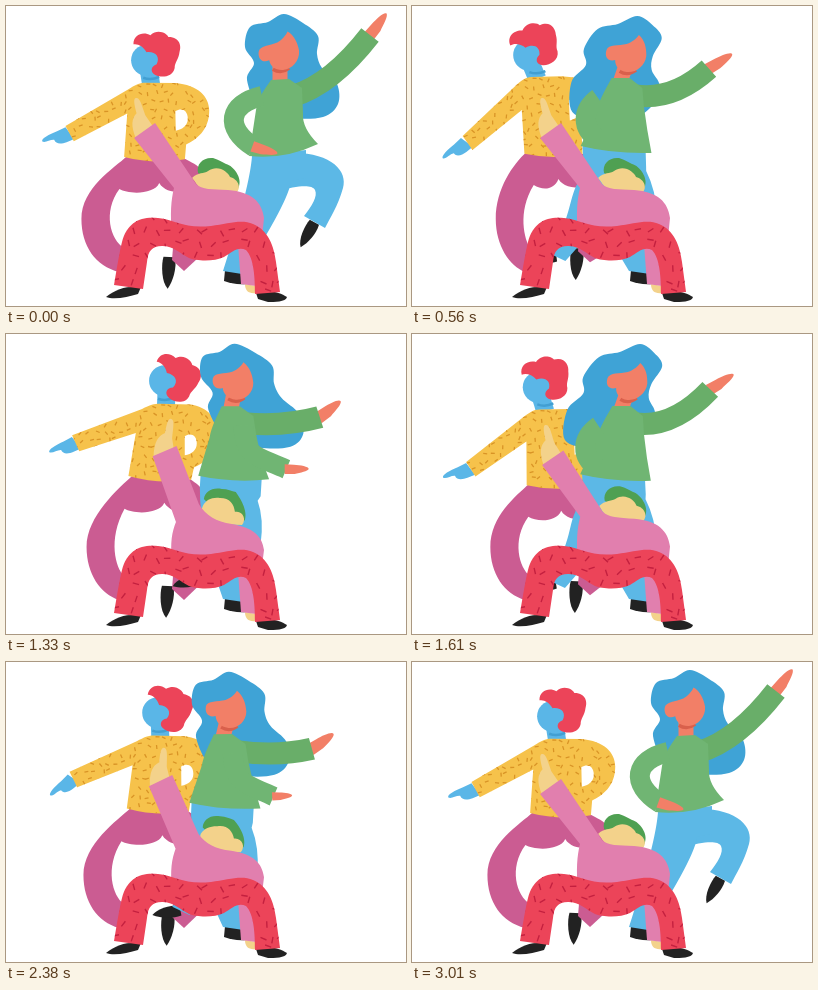
Animation of 400 by 300 pixels, one loop 3.08 s. Source, as an HTML page:

```html
<!DOCTYPE html>
<html>
<head>
<meta charset="utf-8">
<style>
html, body { margin: 0; width: 100%; height: 100%; overflow: hidden; background: #fff; }
svg { display: block; width: 100vw; height: 100vh; }
</style>
</head>
<body>
<svg id="stage" viewBox="0 0 400 300"></svg>
<script>
const STEP = 70, FRAMES = 44, CYCLE = 43;
const C = {
  blue: '#5ab6e7', blueShade: '#429fd2', red: '#ec4459', mustard: '#f6c24b', mustardMark: '#d99426',
  plum: '#cb5c92', pink: '#e17fae', cream: '#f3d28b', leaf: '#4fa052', ink: '#222222',
  redMark: '#c4203f', sea: '#3fa3d6', coral: '#f27f67', coralShade: '#d9604c',
  green: '#70b573', greenShade: '#69ae69', denim: '#5cb8e6'
};

const fill = (d, color, extra = '') => `<path d="${d}" fill="${color}" ${extra}/>`;
const line = (d, color, width, extra = '') =>
  `<path d="${d}" fill="none" stroke="${color}" stroke-width="${width}" ${extra}/>`;
const place = (x, y, turn, body, size = 1) =>
  `<g transform="translate(${x} ${y}) rotate(${turn}) scale(${size})">${body}</g>`;
const lerp = (a, b, t) => a + (b - a) * t;

// Blend two paths that share the same commands.
function mix(a, b, t) {
  const target = b.match(/-?[\d.]+/g);
  let i = 0;
  return a.replace(/-?[\d.]+/g, n => lerp(+n, +target[i++], t));
}

// Eased sway from 0 to 1 and back over one turn.
const wave = turns => Math.sin(2 * Math.PI * turns);
function swing(turns) {
  const v = .5 - .5 * wave(turns + .25);
  return v * v * (3 - 2 * v);
}

// Closed smooth curve through points.
function blob(points) {
  const n = points.length, at = i => points[(i + n) % n];
  return points.reduce((d, b, i) => {
    const a = at(i - 1), c = at(i + 1), e = at(i + 2);
    return d + `C${b.map((x, k) => x + (c[k] - a[k]) / 6)} ${c.map((x, k) => x - (e[k] - b[k]) / 6)} ${c}`;
  }, 'M' + points[0]) + 'Z';
}

// Jittered grid of short dashes.
function dashes(x0, y0, x1, y1, gap, length, seed) {
  const random = () => (seed = seed * 16807 % 2147483647) / 2147483647;
  let d = '', row = 0;
  for (let y = y0; y < y1; y += gap, row++) {
    for (let x = x0 + row % 2 * gap / 2; x < x1; x += gap) {
      const angle = random() * Math.PI, dx = Math.cos(angle) * length, dy = Math.sin(angle) * length;
      d += `M${(x + random() * 5).toFixed(1)} ${(y + random() * 5).toFixed(1)}l${dx.toFixed(1)} ${dy.toFixed(1)}`;
    }
  }
  return d;
}
const knitMarks = dashes(-115, -10, 75, 92, 8.5, 4, 77);
const trouserMarks = dashes(106, 208, 280, 290, 12.5, 6.5, 501);

const SHOE = 'M0 -6C10 -8 22 -5 30 0C24 6 8 7 0 5Z';
const CURL = 'M-13 -16C-13 -26 -3 -29 4 -25C12 -32 21 -26 22 -23C34 -23 35 -13 33 -8C32 0 28 2 28 8' +
  'C26 17 15 18 9 15C3 12 4 6 10 4C14 -3 9 -9 0 -8C-3 -14 -9 -17 -13 -16Z';
const POINTING = 'M-3 -7L-12 -4C-20 -2 -29 1 -28 4C-25 6 -20 3 -16 4C-15 9 -9 9 -4 8L4 6Z';
const PROFILE = 'M-22 -4C-20 -10 -10 -8 -2 -10C4 -12 8 -16 10 -19C16 -14 18 -6 18 2' +
  'C17 12 8 19 -1 18C-9 17 -13 12 -13 6C-20 8 -24 3 -22 -4Z';
const PALM = 'M-2 -6L9 -6C17 -6 27 -5 27 -2C26 1 17 3 10 5L-2 6Z';

const KNIT = [
  'M50 130L102 79C108 74 112 70 118 70L148 69C179 71 191 81 191 95C191 115 178 124 169 129L170 147Q141 153 112 147' +
    'L109 103L60 144ZM156 93C162 89 169 91 169 101C169 108 163 111 157 113Z',
  'M67 98L138 73C146 69 150 68 156 68L186 69C203 71 213 84 213 98C213 118 200 127 189 132L186 144Q154 149 123 140' +
    'L131 97L74 114ZM180 101C186 97 192 100 192 108C192 115 187 119 180 120Z'
];

function man(t) {
  const sway = swing(2 * t - .262), dip = 4 * sway * (1 - sway);
  const fx = lerp(115, 161, sway), fy = lerp(48, 45, sway);
  const cx = lerp(124, 162, sway), cy = lerp(70, 68, sway);
  const hx = lerp(141, 154, sway), hy = lerp(147, 142, sway) + 8 * dip;
  const leg = 85 - 3 * sway - 8 * dip, lift = -11 * (1 - sway) ** 3;
  const knit = mix(...KNIT, sway);
  const trousers = `M${hx - 27} ${hy - 2}C${hx - 40} ${hy + 10} ${leg} 182 ${leg} 213C${leg} 240 ${leg + 14} 260 113 266` +
    `L118 242C${leg + 29} 234 ${leg + 21} 206 ${leg + 38} ${hy + 31}C${leg + 46} ${hy + 36} ${hx} ${hy + 37} ${hx + 5} ${hy + 25}` +
    `C${hx + 9} ${hy + 32} ${hx + 18} ${hy + 34} 172 ${hy + 34}L205 ${hy + 32}C202 ${hy + 14} 194 ${hy + 8} ${hx + 29} ${hy}Z`;
  const upper = place(lerp(54, 71, sway), lerp(137, 106, sway), -18 + 10 * wave(2 * t + .25), fill(POINTING, C.blue)) +
    line(`M${fx + 2} ${fy + 8}L${cx} ${cy + 2}`, C.blue, 18) +
    line(`M${cx - 8} ${cy - 5}Q${cx} ${cy - 2} ${cx + 8} ${cy - 6}`, C.blueShade, 2.5) +
    `<circle cx="${fx}" cy="${fy}" r="15.5" fill="${C.blue}"/>` +
    place(fx, fy, lerp(-25, 19, sway), fill(CURL, C.red)) +
    `<clipPath id="knit"><path d="${knit}" clip-rule="evenodd"/></clipPath>` +
    fill(knit, C.mustard, 'fill-rule="evenodd"') +
    `<g clip-path="url(#knit)">${place(cx, cy, 0, line(knitMarks, C.mustardMark, 1.3))}</g>`;
  return place(165 - 4 * sway, 252 + lift, 92, fill(SHOE, C.ink), 1.06) +
    fill(`M172 180H205V240L178 ${266 + lift}L166 ${255 + lift}Z`, C.plum) +
    fill(trousers, C.plum) + place(0, 8 * dip, 0, upper);
}

// Outline of the hair around the face centre.
const HAIR = [[3, -38], [22, -29], [37, -16], [36, 2], [41, 16], [56, 32], [57, 52], [42, 65], [10, 66],
  [-20, 58], [-34, 28], [-27, 11], [-36, -5], [-31, -25], [-13, -30]];
const TOP = [
  'M265 74C258 84 252 92 250 104L243 150Q278 154 312 138Q296 122 297 108L296 82L283 73Z',
  'M201 72C196 82 190 92 187 104L172 140Q205 148 243 147Q238 125 234 100L232 82L219 72Z'
];
const SLEEVE = ['M287 90Q326 78 364 29', 'M223 89Q262 96 298 72'];
const STANDING_LEG = [
  'M246 150Q244 180 217 265L236 268Q283 195 285 175L300 172L300 144Z',
  'M174 138Q172 190 217 265L238 268Q256 205 237 165L237 160L237 144Z'
];
const FREE_LEG = [
  'M285 147C325 146 342 165 337 182C332 200 324 212 319 222L298 210C306 200 312 190 309 184C306 178 290 180 272 185L250 178Z',
  'M200 150C205 180 195 195 190 212C184 228 172 242 160 255L143 247C152 235 158 222 163 205C166 195 168 185 172 178L178 160Z'
];

function woman(t) {
  const turn = swing(3 * t), lag = wave(3 * t), trail = turn * lag;
  const drift = 10 * trail, reach = 100 * Math.max(0, trail);
  const fx = lerp(275, 217, turn), fy = lerp(46, 48, turn), cx = lerp(274, 210, turn);
  const hair = HAIR.map(([x, y]) => [fx + x + .37 * (y + 26) * (lag - .75 * turn), fy + y]);
  const cuffX = lerp(248, 190, turn) + reach, cuffY = lerp(141, 134, turn);
  const lowArm = `M${lerp(256, 188, turn) + reach * .45} ${lerp(90, 92, turn)}` +
    `C${lerp(222, 172, turn) + reach * .7} ${lerp(98, 104, turn) + reach * .3} ` +
    `${lerp(218, 172, turn) + reach * .9} 122 ${cuffX} ${cuffY}`;
  const upper = fill(blob(hair), C.sea) +
    place(lerp(364, 298, turn), lerp(29, 72, turn) + 26 * trail, -48 + 20 * turn, fill(PALM, C.coral)) +
    line(`M${fx - 1} ${fy + 8}L${cx} 75`, C.coral, 15) +
    line(`M${fx - 8} ${fy + 17}Q${fx} ${fy + 22} ${fx + 8} ${fy + 16}`, C.coralShade, 4) +
    place(fx, fy, -10 * (1 - turn), fill(PROFILE, C.coral)) +
    line(mix(...SLEEVE, turn).replace(/[\d.]+$/, y => +y + 26 * trail), C.greenShade, 22) +
    fill(mix(...TOP, turn), C.green) + line(lowArm, C.green, 20) +
    place(cuffX, cuffY, 20 * (1 - turn), fill(PALM, C.coral), Math.max(0, .9 - .8 * turn * (1 - lag)));
  const lean = drift / 120;
  return place(lerp(308, 151, turn) + 2 * drift, lerp(216, 250, turn), 118 + 55 * turn, fill(SHOE, C.ink), .95) +
    fill('M219 264L240 267V278C232 279 224 277 218 275Z', C.ink) +
    place(2 * drift, 0, 0, fill(mix(...FREE_LEG, turn), C.denim)) +
    `<g transform="matrix(1 0 ${-lean} 1 ${265 * lean} 0)">${fill(mix(...STANDING_LEG, turn), C.denim)}</g>` +
    `<g transform="matrix(1 0 ${lean} 1 ${-20 * lean} 0)">${upper}</g>`;
}

const TROUSERS = 'M108 279C111 262 113 248 116 236C121 216 135 210 152 212C170 214 178 223 205 220' +
  'C222 218 235 213 247 218C262 224 268 240 270 256L274 286L249 288C249 272 248 252 240 244' +
  'C232 240 226 246 218 251C208 256 190 255 183 252C173 247 168 240 156 240C146 240 142 245 141 256L137 283Z';

function lunger(t) {
  const s = swing(6 * t - .06);
  const hair = mix('M192 167C190 158 197 151 207 152C213 154 216 156 220 158C228 160 236 172 233 180L230 187L205 175Z',
    'M198 165C199 158 206 153 216 155C222 155 226 157 230 158C234 164 242 176 239 186L234 191L210 178Z', s);
  const face = mix('M186 172C192 166 198 168 202 165C212 158 222 166 224 171C232 173 236 182 230 187L205 186C192 184 190 176 186 172Z',
    'M197 172C200 166 206 163 214 164C224 164 228 170 229 178C237 176 241 186 236 191L212 190C198 188 193 180 197 172Z', s);
  const shirt = mix('M128 132L149 117L190 178C196 184 206 183 222 184C246 186 256 196 258 212L256 232L166 228C164 208 165 194 168 182Z',
    'M147 122L171 112L193 170C200 181 210 188 226 190C248 194 256 202 258 216L256 232L166 228C164 208 166 198 170 188Z', s);
  const hand = 'M-10 7C-12 -8 -9 -14 -3 -18C-3 -24 -3 -33 0 -33C4 -33 4 -28 5 -14L10 0Z';
  return fill('M239 278L250 280V287C243 288 239 285 239 278Z', C.cream) +
    fill('M232 238L250 240V280L235 278Z', C.pink) +
    place(138 + 21 * s, 124 - 7 * s, -15 + 26 * s, fill(hand, C.cream)) +
    fill(hair, C.leaf) + fill(face, C.cream) + fill(shirt, C.pink) +
    fill('M100 291C110 283 120 280 135 281L132 288C122 291 108 294 100 291Z', C.ink) +
    fill('M250 287C262 283 274 286 281 291C280 296 268 296 262 296L252 293Z', C.ink) +
    fill(TROUSERS, C.red) +
    `<clipPath id="legs"><path d="${TROUSERS}"/></clipPath>` +
    line(trouserMarks, C.redMark, 1.4, 'clip-path="url(#legs)"');
}

const stage = document.getElementById('stage');
const start = performance.now();
let shown = -1;

function render() {
  const frame = Math.floor((performance.now() - start) / STEP) % FRAMES;
  if (frame !== shown) {
    shown = frame;
    const t = frame % CYCLE / CYCLE;
    stage.innerHTML = man(t) + woman(t) + lunger(t);
  }
  requestAnimationFrame(render);
}
render();
</script>
</body>
</html>
```
